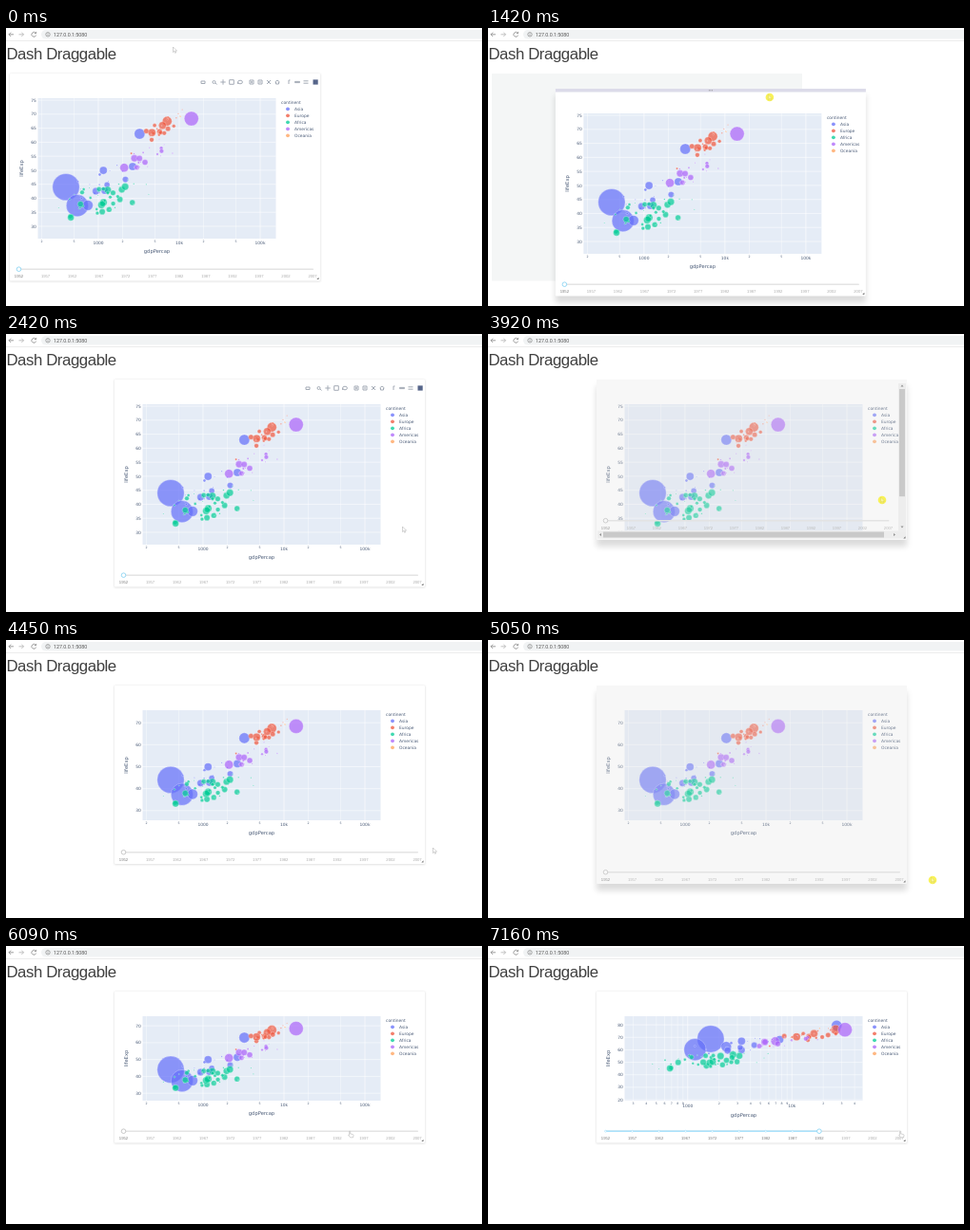
An HTML page for the animation above (7260 ms loop, 500 by 293 pixels).

```html
<!DOCTYPE html>
<html lang="en">
<head>
<meta charset="utf-8">
<title>Dash Draggable</title>
<style>
html, body { margin: 0; width: 100%; height: 100%; overflow: hidden; background: #fff; }
svg { display: block; width: 500px; height: 293px; }
</style>
</head>
<body>
<svg viewBox="0 0 500 293">
  <defs>
    <filter id="soft" x="-10%" y="-10%" width="120%" height="125%"><feGaussianBlur stdDeviation="3"/></filter>
    <filter id="thin" x="-5%" y="-5%" width="110%" height="110%"><feGaussianBlur stdDeviation=".8"/></filter>
  </defs>
  <g fill="none" stroke="#777" stroke-width=".7">
    <path d="M8 6.8H3M5.2 4.6L3 6.8l2.2 2.2"/>
    <path d="M13.5 6.8h5m-2.2-2.2l2.2 2.2-2.2 2.2" stroke="#aaa"/>
    <path d="M31.2 5.3a2.4 2.4 0 1 0 .4 2.3M31.7 3.9v1.8h-1.8"/>
    <rect x="37" y="2" width="480" height="9.6" rx="4.8" fill="#f1f3f4" stroke="none"/>
    <circle cx="44" cy="6.8" r="2.2" stroke-width=".6"/>
    <path d="M44 6.5v1.5M44 5.3v.6" stroke-width=".6"/>
    <path d="M0 13.5H500" stroke="#e4e4e4"/>
  </g>
  <text x="50" y="8.7" font-size="5.3" fill="#555" font-family="Roboto, sans-serif">127.0.0.1:5080</text>
  <text x=".4" y="33" font-size="16.8" letter-spacing="-.42" fill="#404040" font-family="Liberation Sans, Arial, sans-serif">Dash Draggable</text>
  <g id="scene"></g>
</svg>
<script>
const LOOP = 7260, CARD_W = 326, PLOT_X = 29.5, PLOT_Y = 26, PLOT_W = 250;
const scene = document.getElementById('scene');

const clamp = v => Math.max(0, Math.min(1, v));
const mix = (a, b, f) => a + (b - a) * f;
const ramp = (t, from, to) => clamp((t - from) / (to - from));
const within = (t, ...spans) => spans.some(([a, b]) => t >= a && t < b);

let seed = 11;
const rand = () => (seed = seed * 16807 % 2147483647) / 2147483647;

// Incomes are log10; life = base + slope * (income - 3). Growth and gain lead to 1992.
const continents = [
  { name: 'Asia', color: '#636efa', count: 22, from: 2.55, to: 3.55, base: 45, slope: 10, scatter: 9, growth: .4, gain: 17 },
  { name: 'Europe', color: '#ef553b', count: 25, from: 3.4, to: 4.1, base: 51, slope: 18, scatter: 5, growth: .42, gain: 7 },
  { name: 'Africa', color: '#00cc96', count: 48, from: 2.5, to: 3.7, base: 39.5, slope: 6, scatter: 10, growth: .15, gain: 12 },
  { name: 'Americas', color: '#ab63fa', count: 20, from: 3.15, to: 3.95, base: 44, slope: 18, scatter: 9, growth: .3, gain: 12 },
  { name: 'Oceania', color: '#ffa15a', count: 2, from: 4, to: 4.03, base: 69, slope: 0, scatter: 1, growth: .35, gain: 8 }
];

// Largest countries: continent, income, life, population, growth, gain
const largest = [
  [0, 2.6, 44, 556, .62, 24.7], [0, 2.74, 37.4, 372, .33, 22.8],
  [0, 3.51, 63, 86, .92, 16.4], [0, 2.87, 37.5, 82, .5, 25],
  [1, 3.85, 67.5, 69, .57, 8.6], [3, 4.15, 68.4, 157, .36, 7.7], [3, 3.32, 50.9, 57, .52, 16]
];

const bubbles = continents.flatMap((k, c) => [
  ...largest.filter(row => row[0] == c).map(([, income, life, pop, growth, gain]) => ({ c, income, life, pop, growth, gain })),
  ...Array.from({ length: k.count }, () => {
    const income = mix(k.from, k.to, (rand() + rand()) / 2);
    return {
      c, income,
      life: k.base + k.slope * (income - 3) + (rand() - .5) * k.scatter,
      pop: .8 + 45 * rand() ** 5,
      growth: k.growth + (rand() - .5) * .2,
      gain: k.gain
    };
  })
]);

const rect = (x, y, w, h, fill, extra = '') =>
  `<rect x="${x}" y="${y}" width="${w}" height="${h}" fill="${fill}" ${extra}/>`;
const dot = (x, y, r, fill, extra = '') => `<circle cx="${x}" cy="${y}" r="${r}" fill="${fill}" ${extra}/>`;
const line = (d, color, width) => `<path d="${d}" fill="none" stroke="${color}" stroke-width="${width}"/>`;
function label(s, x, y, { size = 4.4, anchor = 'middle', fill = '#4a5b77', font = 'DejaVu Sans', extra = '' } = {}) {
  return `<text x="${x}" y="${y + size * .36}" font-size="${size}" text-anchor="${anchor}" fill="${fill}" font-family="${font}, sans-serif" ${extra}>${s}</text>`;
}

function plot(h, u) {
  const x0 = mix(2.253, 2.394, u), x1 = mix(5.194, 4.679, u);
  const y0 = mix(25.6, 19.3, u), y1 = mix(75.7, 86.9, u);
  const px = v => PLOT_X + (v - x0) / (x1 - x0) * PLOT_W;
  const py = v => PLOT_Y + (y1 - v) / (y1 - y0) * h;
  const bottom = PLOT_Y + h, mid = PLOT_Y + h / 2;
  let out = rect(PLOT_X, PLOT_Y, PLOT_W, h, '#e5ecf6');

  const step = h > 140 ? 5 : 10;
  for (let v = Math.ceil(y0 / step) * step; v < y1; v += step) {
    out += line(`M${PLOT_X} ${py(v)}h${PLOT_W}`, '#fff', .5) + label(v, PLOT_X - 1.6, py(v), { anchor: 'end' });
  }
  for (let e = 2; e < 6; e++) for (let d = 1; d < 10; d++) {
    const v = e + Math.log10(d), major = d == 1;
    if (v < x0 || v > x1 || (!u && !major && d != 2 && d != 5)) continue;
    out += line(`M${px(v)} ${PLOT_Y}v${h}`, '#fff', major ? .6 : .4);
    out += label(major ? ['100', '1000', '10k', '100k'][e - 2] : d, px(v),
      bottom + (major ? mix(4, 5, u) : 3), { size: major ? 4.4 : 3.2 });
  }

  out += '<g clip-path="url(#plotClip)" fill-opacity=".7" stroke="#fff" stroke-opacity=".8" stroke-width=".35">';
  for (const b of bubbles) {
    const r = 14.2 * Math.sqrt(b.pop / 556);
    out += dot(px(b.income + b.growth * u), py(b.life + b.gain * u), r, continents[b.c].color);
  }
  out += '</g>' + label('gdpPercap', PLOT_X + PLOT_W / 2, bottom + mix(13.3, 15, u), { size: 5.2 });
  out += label('lifeExp', 12.5, mid, { size: 5.2, extra: `transform="rotate(-90 12.5 ${mid})"` });

  out += label('continent', 285, 30, { anchor: 'start' });
  continents.forEach(({ name, color }, i) => {
    const y = 37.3 + 7 * i;
    out += dot(292, y, 1.9, color, 'fill-opacity=".75"') + label(name, 299, y, { anchor: 'start' });
  });
  return out;
}

// Icons as stroked paths around their own centre, in groups
const icons = [
  ['M-2 -1h4v2.5h-4z'],
  ['M1 1l1.5 1.5M1 0a1.5 1.5 0 1 0-3 0a1.5 1.5 0 1 0 3 0', 'M-2.7 0h5.4M0-2.7v5.4', 'M-2.3-2.3h4.6v4.6h-4.6z', 'M-2.4 0a2.4 1.8 0 1 0 4.8 0a2.4 1.8 0 1 0-4.8 0v2'],
  ['M-2-2h4v4h-4zM-1 0h2M0-1v2', 'M-2-2h4v4h-4zM-1 0h2', 'M-2-2l4 4M2-2l-4 4', 'M-2.5 0l2.5-2 2.5 2M-1.5 0v2h3v-2'],
  ['M0 2v-4h1.5', 'M-2.5-.6h5v1.2h-5z', 'M-2.5-1.2h5M-2.5 1.2h5']
];
function modebar() {
  let x = 203, out = '';
  for (const group of icons) {
    for (const d of group) {
      out += `<g transform="translate(${x} 9)">${line(d, '#a4abb6', 1)}</g>`;
      x += 9;
    }
    x += 3;
  }
  return out + rect(318.5, 6.4, 5.2, 5.2, '#56658a');
}

function slider(y, gap, picked, hot) {
  const x = i => 9.5 + gap * i, grey = '#e4e4e4';
  let out = rect(x(0), y - .8, gap * 11 + 1, 1.6, grey, 'rx=".8"');
  if (picked) out += rect(x(0), y - .8, gap * picked, 1.6, '#abe2fb');
  for (let i = 0; i < 12; i++) {
    if (picked) out += dot(x(i), y, 1, '#fff', `stroke="${i <= picked ? '#96dbfa' : grey}" stroke-width=".5"`);
    out += label(1952 + 5 * i, x(i), y + 7.6, { size: 4.2, fill: i <= picked ? '#777' : '#aaa', font: 'Liberation Sans' });
  }
  return out + dot(x(picked), y, 2.3, '#fff', `stroke="${hot ? '#7fd0f2' : '#bbb'}" stroke-width=".8"`);
}

function scrollbars(h) {
  const b = h - 9.5;
  return rect(317, 4, 8, b - 4, '#f1f1f1') + rect(318, 10, 6, (b - 18) * .8, '#c1c1c1')
    + rect(1, b, 324, 8, '#f1f1f1') + rect(7, b + 1, 295, 6, '#c1c1c1')
    + `<path d="M319.5 7.5l1.5-2 1.5 2zM319.5 ${b - 5}l1.5 2 1.5-2zM5 ${b + 2.5}l-2 1.5 2 1.5zM312 ${b + 2.5}l2 1.5-2 1.5z" fill="#777"/>`;
}

function cardBox(t) {
  const back = ramp(t, 1850, 2020);
  return {
    x: 4 + 140 * ramp(t, 950, 1630) ** 2 - 30 * back,
    y: 48 + 16 * (ramp(t, 950, 1400) - back),
    h: 218.5 - 49.5 * ramp(t, 3280, 3800) + 19 * ramp(t, 4150, 4250)
      + 21 * ramp(t, 4760, 5020) - 49.5 * ramp(t, 5150, 5600)
  };
}
const isDragging = t => within(t, [920, 1850]);
const isSizing = t => within(t, [3280, 4150], [4760, 5750]);

function card(t) {
  const { x, y, h } = cardBox(t);
  const dragging = isDragging(t), sizing = isSizing(t), picked = t >= 6520 ? 8 : 0;
  const plotH = t < 4350 ? 148 : t < 5850 ? 116 : 89;
  const scroll = h < plotH + 68, inset = scroll ? 8 : 0;
  let out = dragging ? rect(mix(4, 114, ramp(t, 1480, 1620)), 48, CARD_W, 218.5, '#f4f6f6') : '';
  out += `<g transform="translate(${x} ${y})">`;
  out += dragging || sizing
    ? rect(0, 7, CARD_W, h, '#000', 'opacity=".14" filter="url(#soft)"')
    : rect(-.2, .3, CARD_W + .4, h + .4, '#000', 'opacity=".14" filter="url(#thin)"');
  out += rect(0, 0, CARD_W, h, '#fff', 'rx="1"');
  out += `<clipPath id="plotClip">${rect(PLOT_X, PLOT_Y, PLOT_W, plotH, '#000')}</clipPath>`;
  out += `<clipPath id="cardClip">${rect(0, 0, CARD_W - inset, h - (scroll ? 9.5 : 0), '#000')}</clipPath>`;
  out += '<g clip-path="url(#cardClip)">' + plot(plotH, ramp(t, 6620, 7020));
  if (within(t, [0, 900], [1850, 2720])) out += modebar();
  out += slider(h - 12.3 - inset, scroll ? 27 : 28.05, picked, !sizing && (t < 3280 || picked)) + '</g>';
  if (scroll) out += scrollbars(h);
  if (sizing) out += rect(0, 0, CARD_W, h, '#e0e0e0', 'opacity=".25"');
  if (dragging) {
    out += rect(0, 0, CARD_W, 3.5, '#dcdbe9');
    for (const i of [-1, 0, 1]) out += dot(CARD_W / 2 + i * 1.6, 1.8, .5, '#888');
  }
  return out + `<path d="M${CARD_W - 1.5} ${h - 1.5}v-2.2l-2.2 2.2z" fill="#777"/></g>`;
}

// Time, x, y; while dragging the pointer stays with the card
const stops = [
  [100, 177, 23], [500, 80, 190], [900, 229, 57], [1850, 369, 73], [2420, 418, 206],
  [2820, 436, 262], [3280, 436, 262], [3920, 414, 175], [4420, 450, 222], [4720, 437, 232],
  [5020, 467, 253], [5620, 456, 203], [6020, 361, 198], [6520, 361, 198], [6820, 470, 219], [7120, 433, 198]
];
function pointer(t) {
  if (isDragging(t)) {
    const { x, y } = cardBox(t);
    return [x + 225, y + 9];
  }
  const i = stops.findIndex(s => s[0] > t);
  if (i < 1) return stops.at(i).slice(1);
  const [a, b] = [stops[i - 1], stops[i]], f = ramp(t, a[0], b[0]);
  return [mix(a[1], b[1], f), mix(a[2], b[2], f)];
}

function cursor(t) {
  const [x, y] = pointer(t);
  const pressed = isDragging(t) || isSizing(t) || within(t, [6440, 6540]);
  const hand = within(t, [5950, 6620], [7020, LOOP]);
  const shape = hand
    ? 'M1.5 0q.7 0 .7.7v2.2l2.7.7q.7.2.6 1l-.4 2.2h-3l-2-2.5q.2-.8 1 0V.7q0-.7.4-.7z'
    : 'M0 0v5.6l1.3-1.2.9 2 .9-.4-.9-1.900h1.900z'.replace(/00/g, '');
  return (pressed ? dot(x, y, 4.3, '#f7f03c', 'opacity=".85"') : '')
    + `<path transform="translate(${x - 1.5} ${y - 3})" d="${shape}" fill="#fff" fill-opacity="${pressed ? .4 : 1}" stroke="${pressed ? '#d8cf50' : '#a0a0a0'}" stroke-width=".45"/>`;
}

const start = performance.now();
let shown = -1;
function frame() {
  const ms = (performance.now() - start) % LOOP;
  const t = Math.max(0, Math.floor((ms - 20) / 100) * 100 + 20);
  if (t !== shown) {
    scene.innerHTML = card(t) + cursor(t);
    shown = t;
  }
  requestAnimationFrame(frame);
}
frame();
</script>
</body>
</html>
```
